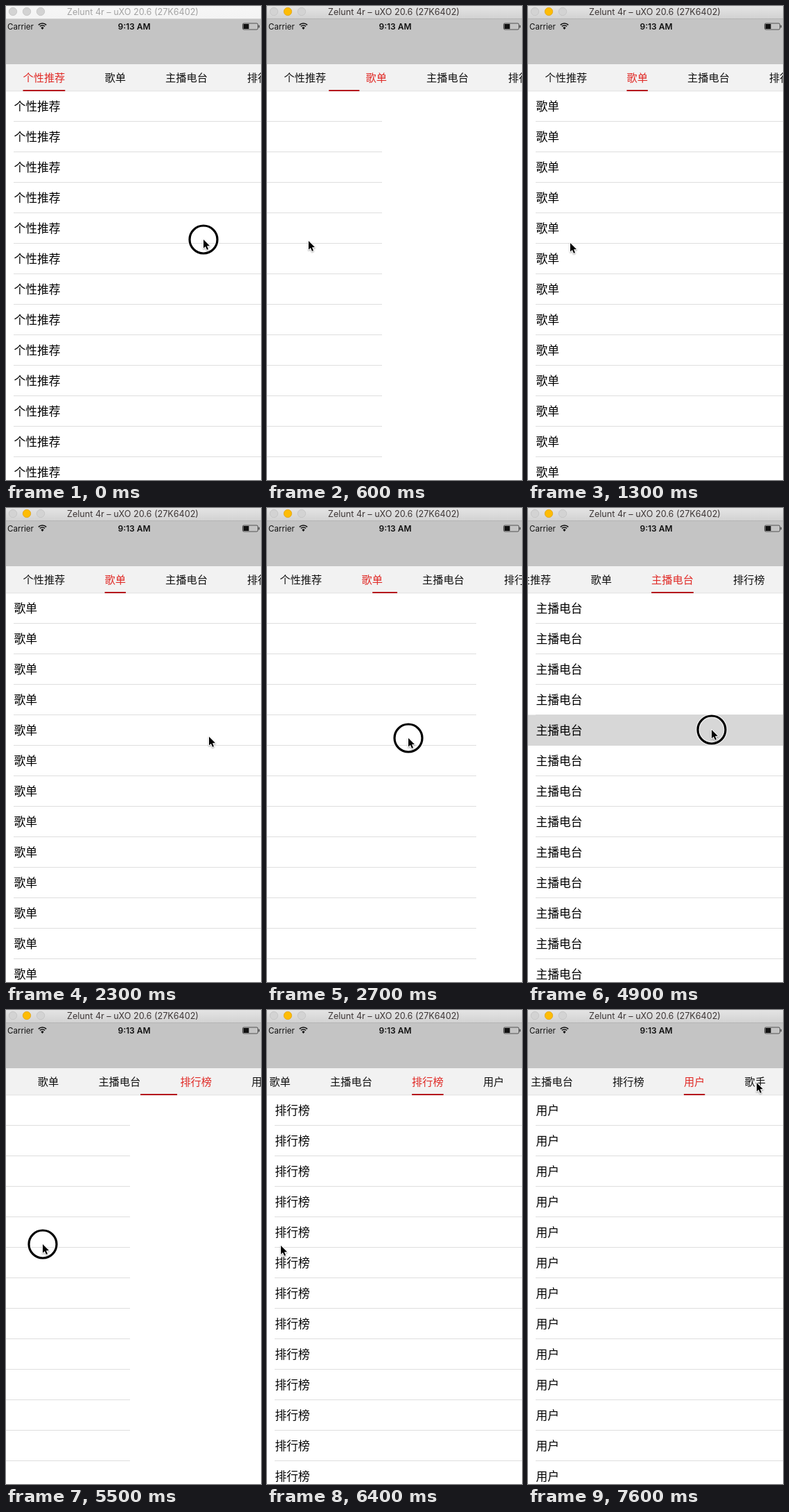
An HTML page with a canvas for the animation above (8000 ms loop, 368 by 684 pixels).

```html
<!DOCTYPE html>
<html lang="zh-CN">
<head>
<meta charset="utf-8">
<title>Tab pager</title>
<style>
html, body { margin: 0; width: 100%; height: 100%; overflow: hidden; background: #fff; }
canvas { display: block; width: 368px; height: 684px; }
</style>
</head>
<body>
<canvas id="stage"></canvas>
<script>
const W = 368, H = 684, LOOP = 8000, STEP = 100;
const TOP = 123, ROW = 44, EM = 15.2, GAP = 57.2, SLOP = 23;
const CJK = '"Noto Sans CJK SC", "Noto Sans CJK", "Noto Sans CJK JP", sans-serif';
const UI = 'Inter, Roboto, sans-serif';

const canvas = document.getElementById('stage');
const ctx = canvas.getContext('2d');
const dpr = window.devicePixelRatio || 1;
canvas.width = W * dpr;
canvas.height = H * dpr;

let nextX = 24.5;
const tabs = ['个性推荐', '歌单', '主播电台', '排行榜', '用户', '歌手'].map(name => {
  const tab = { name, x: nextX, w: name.length * EM };
  nextX += tab.w + GAP;
  return tab;
});
const barStops = [0, -4, 52, 139, 226, 226];

// Each swipe drags from `page` to the next one, whose rows arrive at `load`.
const swipes = [
  { page: 0, x: 285, down: 0, up: 600, load: 1200 },
  { page: 1, x: 293, down: 2400, up: 3050, load: 3800 },
  { page: 2, x: 265, down: 4700, up: 5650, load: 6300 }
];
const tap = { down: 7200, up: 7400, page: 4 };
const HIGHLIGHT = 4850, SETTLE = 520;

// time, x, y
const pointerPath = [
  [0, 285, 337], [100, 283, 337], [300, 215, 336], [500, 90, 338], [700, 30, 340],
  [1000, 22, 342], [1200, 32, 342], [1300, 61, 342], [1500, 170, 338], [1700, 280, 333],
  [1800, 296, 332], [1900, 293, 330], [2400, 293, 330], [2500, 272, 331], [2700, 204, 332],
  [2900, 100, 338], [3100, 30, 346], [3400, -4, 353], [3800, -8, 355], [4000, 60, 345],
  [4200, 200, 330], [4400, 265, 321], [4900, 265, 320], [5000, 255, 321], [5200, 190, 327],
  [5400, 95, 335], [5500, 53, 338], [5700, 20, 341], [6400, 20, 340], [6500, 45, 320],
  [6700, 220, 180], [6900, 330, 105], [LOOP, 330, 105]
];

const mix = (a, b, k) => a + (b - a) * k;

function pointerAt(t) {
  const i = pointerPath.findIndex(p => p[0] > t);
  const a = pointerPath[i - 1], b = pointerPath[i];
  const k = (t - a[0]) / (b[0] - a[0]);
  return { x: mix(a[1], b[1], k), y: mix(a[2], b[2], k) };
}

function pageAt(t) {
  if (t >= tap.up) return tap.page;
  const s = swipes.filter(s => t >= s.down).pop();
  const x = pointerAt(Math.min(t, s.up)).x;
  const drag = Math.max(0, s.x - SLOP - x) / W;
  const u = Math.min(1, Math.max(0, (t - s.up) / SETTLE));
  return s.page + mix(drag, 1, 1 - (1 - u) ** 3);
}

function isLoaded(page, t) {
  if (page === 0) return true;
  if (page === tap.page) return t >= tap.up;
  const s = swipes[page - 1];
  return !!s && t >= s.load;
}

function rect(x, y, w, h, color) {
  ctx.fillStyle = color;
  ctx.fillRect(x, y, w, h);
}

function text(str, x, y, font, color, align = 'left') {
  ctx.font = font;
  ctx.fillStyle = color;
  ctx.textAlign = align;
  ctx.fillText(str, x, y);
}

function circle(x, y, r, fill, stroke, width = 1) {
  ctx.beginPath();
  ctx.arc(x, y, r, 0, Math.PI * 2);
  if (fill) {
    ctx.fillStyle = fill;
    ctx.fill();
  }
  if (stroke) {
    ctx.strokeStyle = stroke;
    ctx.lineWidth = width;
    ctx.stroke();
  }
}

function drawWindowBar(active) {
  const g = ctx.createLinearGradient(0, 0, 0, 18);
  g.addColorStop(0, active ? '#e4e4e4' : '#f6f6f6');
  g.addColorStop(1, active ? '#d2d2d2' : '#f4f4f4');
  rect(0, 0, W, 18, g);
  rect(0, 18, W, 1, active ? '#b4b4b4' : '#d4d4d4');
  [10, 30, 50].forEach((x, i) => {
    const lit = active && i === 1;
    circle(x, 8, 5.7, lit ? '#fdbc05' : '#d3d3d3', lit ? '#dfa31a' : '#c2c2c2', 0.8);
  });
  text('Zelunt 4r – uXO 20.6 (27K6402)', 183, 13, `12.6px ${UI}`,
    active ? '#3c3535' : '#a3a3a3', 'center');
}

function drawStatus() {
  rect(0, 19, W, 65, '#c4c4c4');
  text('Carrier', 2, 33.5, `11.6px ${UI}`, '#111');
  text('9:13 AM', 185, 33.5, `600 12px ${UI}`, '#111', 'center');

  ctx.strokeStyle = '#111';
  ctx.lineWidth = 1.7;
  for (const r of [8, 5]) {
    ctx.beginPath();
    ctx.arc(52.5, 33, r, -Math.PI * 0.75, -Math.PI * 0.25);
    ctx.stroke();
  }
  ctx.beginPath();
  ctx.moveTo(52.5, 34);
  ctx.arc(52.5, 33.5, 3, -Math.PI * 0.75, -Math.PI * 0.25);
  ctx.fillStyle = '#111';
  ctx.fill();

  ctx.lineWidth = 0.8;
  ctx.strokeStyle = '#333';
  ctx.beginPath();
  ctx.roundRect(341.5, 25, 22, 9, 1.8);
  ctx.stroke();
  rect(342.5, 26, 8, 7, '#111');
  rect(364.5, 27.7, 1.3, 3.6, '#333');
}

function drawTabs(p) {
  const i = Math.floor(p), k = p - i;
  const a = tabs[i], b = tabs[i + 1];
  const shift = Math.max(0, mix(barStops[i], barStops[i + 1], k));
  rect(0, 84, W, 39, '#f2f2f2');
  rect(0, 122.5, W, 0.7, '#dcdcdc');
  tabs.forEach((tab, n) => {
    text(tab.name, tab.x - shift, 108.7, `${EM}px ${CJK}`,
      n === Math.round(p) ? '#e02a26' : '#111');
  });
  rect(mix(a.x, b.x, k) - shift, 121, mix(a.w, b.w, k), 2, '#b5161c');
}

function drawPage(page, x, pressedRow) {
  for (let r = 0; r < 13; r++) {
    const y = TOP + r * ROW;
    if (r === pressedRow) rect(x, y - 0.5, W, ROW + 0.5, '#d7d7d7');
    text(tabs[page].name, x + 11.5, y + 28, `16.8px ${CJK}`, '#000');
    if (r < 12 && r !== pressedRow) rect(x + 11, y + 43, W - 11, 1, '#dedede');
  }
}

function drawPointer({ x, y }, pressed) {
  if (pressed) {
    circle(x, y, 20, null, 'rgba(255,255,255,.7)', 5.5);
    circle(x, y, 20, null, '#000', 3.2);
  }
  ctx.save();
  ctx.translate(x, y);
  ctx.beginPath();
  ctx.moveTo(0, 0);
  for (const [px, py] of [[0, 12.6], [2.9, 10], [5, 14.8], [7, 13.9], [5, 9.2], [9, 9]]) {
    ctx.lineTo(px, py);
  }
  ctx.closePath();
  ctx.lineJoin = 'round';
  ctx.shadowColor = 'rgba(0,0,0,.35)';
  ctx.shadowBlur = 2 * dpr;
  ctx.shadowOffsetY = dpr;
  ctx.strokeStyle = '#fff';
  ctx.lineWidth = 2;
  ctx.stroke();
  ctx.shadowColor = 'transparent';
  ctx.fillStyle = '#000';
  ctx.fill();
  ctx.restore();
}

function draw(t) {
  const p = pageAt(t);
  const pressed = [...swipes, tap].some(s => t >= s.down && t < s.up);
  ctx.setTransform(dpr, 0, 0, dpr, 0, 0);
  rect(0, 0, W, H, '#fff');
  for (let n = Math.floor(p); n <= Math.ceil(p); n++) {
    const held = n === 2 && p === 2 && t >= HIGHLIGHT && t < swipes[2].up;
    if (isLoaded(n, t)) drawPage(n, (n - p) * W, held ? 4 : -1);
  }
  drawWindowBar(t >= STEP);
  drawStatus();
  drawTabs(p);
  drawPointer(pointerAt(t), pressed);
}

const start = performance.now();
function tick() {
  const t = (performance.now() - start) % LOOP;
  draw(Math.floor(t / STEP) * STEP);
  requestAnimationFrame(tick);
}
tick();
</script>
</body>
</html>
```
